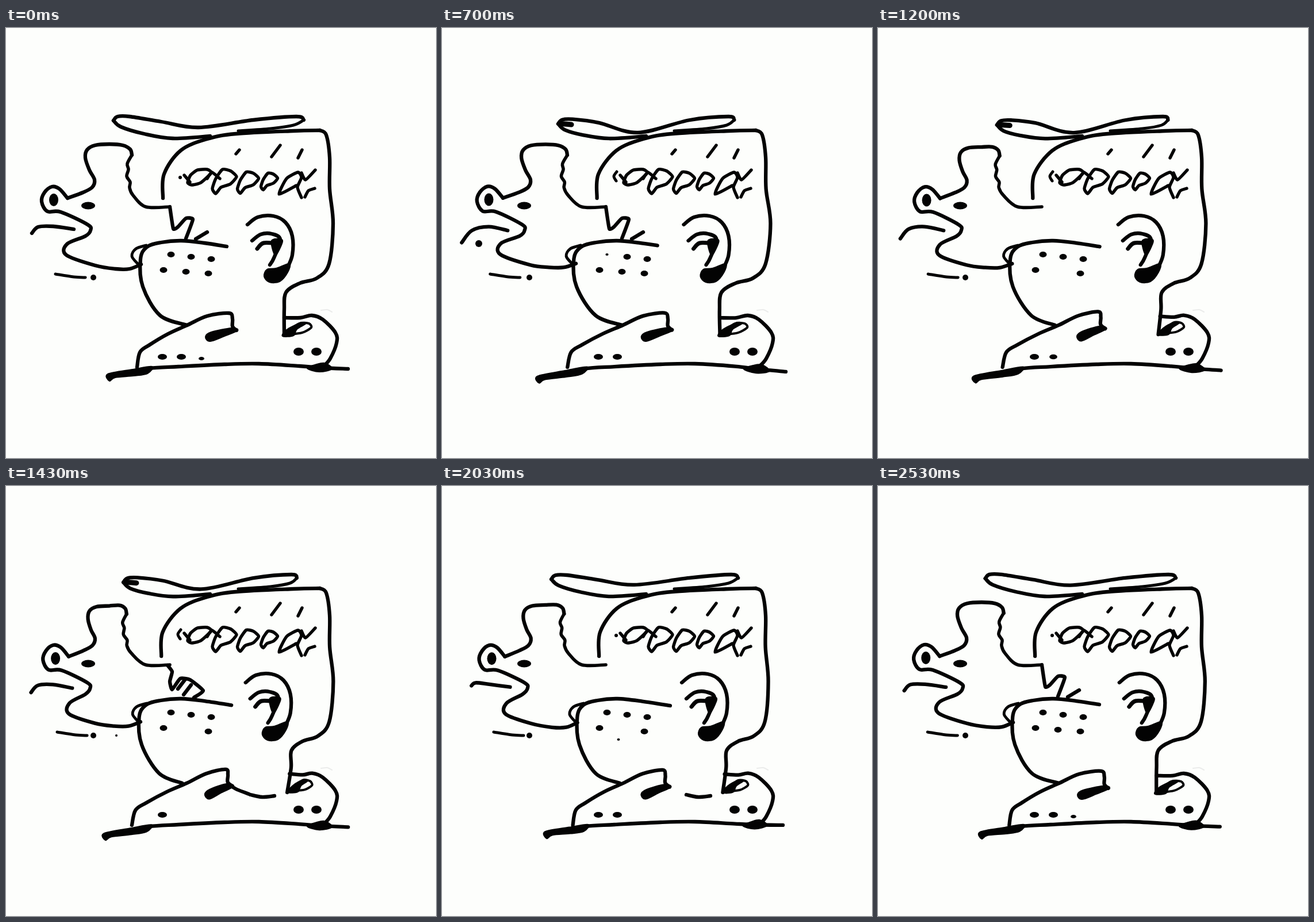
Recreate the animation shown at these times as an HTML page with a canvas. Size 748 px wide and 748 px high, loop 2.56 s.

```html
<!DOCTYPE html>
<html lang="en">
<head>
<meta charset="utf-8">
<title>Wobbling ink head</title>
<style>
html, body { margin: 0; width: 100%; height: 100%; overflow: hidden; background: #fdfefc; }
canvas { display: block; width: 748px; height: 748px; }
</style>
</head>
<body>
<canvas id="stage" width="748" height="748"></canvas>
<script>
const ctx = document.getElementById('stage').getContext('2d');
const LOOP = 2560, STEP = LOOP / 77, FADE = 120;
const PAPER = '#fdfefc', INK = '#030303';

const shapes = [], sways = [];

// A soft handle: points of the group near (x, y) swing once per loop
const sway = (group, x, y, reach, ax, ay, lag) =>
  sways.push({ group, x, y, reach, ax, ay, lag });

const line = (groups, points, opts = {}) => shapes.push({
  groups, width: 6.3, bend: 1, color: INK,
  pts: points.split(' ').map(p => p.split(',').map(Number)), ...opts,
});
const blob = (groups, points) => line(groups, points, { closed: true, fill: true, width: 2 });
const spot = (groups, x, y, rx, ry, on) =>
  shapes.push({ groups, pts: [[x, y]], rx, ry, on, color: INK });

// Brim
sway('b', 190, 160, 58, 21, 8, .4);
sway('b', 519, 160, 25, -14, 0, .3);
sway('t', 340, 172, 48, 8, 12, .8);
line('bt', '187,161 194,154 215,154 270,163 335,173 430,160 505,154 518,160');
line('b', '518,160 500,169 460,175 404,179', { width: 5 });
line('b', '187,161 200,172 240,184 290,192 355,188');
line('b', '194,161 212,163', { width: 9, on: [300, 1650] });

// Skull and neck
sway('h', 485, 485, 52, 17, 0, -.95);
sway('h', 273, 280, 50, -5, 0, .7);
sway('h', 568, 350, 60, 4, 0, 1.3);
line('h', '273,296 275,254 304,213 350,193 400,184 500,179 546,178');
line('h', '546,178 557,186 563,225 563,280 569,340 562,410 541,435 511,444 487,460 484,490 484,533');

// Face with snout
sway('f', 140, 225, 32, 6, 7, -.8);
sway('f', 178, 203, 25, 0, 9, -.8);
sway('f', 216, 222, 28, -12, 2, -.75);
sway('f', 214, 270, 30, -5, 0, 0);
sway('f', 82, 298, 38, 6, 2, -1.2);
sway('f', 147, 352, 22, -5, 0, 1.2);
sway('f', 102, 385, 30, 12, 4, -1.3);
sway('f', 200, 419, 40, -6, -4, 1);
line('f', '285,311 243,311 221,291 215,278 216,268 210,258 213,246 211,236 219,221', { width: 5.6 });
line('f', '219,221 216,211 203,204 180,202 155,204 141,212 138,226 145,247 154,264 150,277 134,286 107,296');
line('f', '107,296 93,280 80,276 67,286 62,302 72,319 95,320 142,342 147,352 138,362 106,376 105,395 155,413 190,419 215,419 235,411');
spot('f', 83, 299, 8, 11);
spot('', 143, 309, 12, 6.5);

// Lip and the dash below it
sway('l', 45, 357, 16, -17, 26, 1.3);
sway('l', 118, 350, 30, -5, 3, .8);
sway('d', 110, 432, 300, 7, 0, -1.3);
line('l', '45,357 56,346 82,345 118,350');
line('d', '86,428 118,433 138,434', { width: 5 });
spot('', 152, 434, 5, 5);
spot('', 192, 434, 2, 2, [1250, 1950]);
spot('', 64, 375, 6, 6, [390, 1200]);

// Teeth: a zigzag that turns into bars
const zigzag = { bend: .5, on: [2050, 1200] }, bars = { bend: .5, on: [1200, 2050] };
line('', '285,311 291,349 299,346 313,331 325,333 313,366', zigzag);
line('', '350,355 330,367', zigzag);
line('', '281,312 289,323 285,340 289,354 303,335 320,337 343,356 327,368', bars);
for (const x of [299, 309]) line('', `${x},${x + 54} ${x + 13},${x + 37}`, bars);

// Cheek
sway('c', 233, 420, 60, -7, 0, 1);
sway('c', 384, 380, 34, 24, 4, -1.4);
sway('c', 310, 517, 32, -10, 0, -.65);
sway('o', 225, 395, 60, -6, 0, 1.6);
line('c', '384,380 345,374 305,370 270,373 245,381 234,402 238,450 268,500 315,517');
line('o', '244,378 226,384 219,397 230,411', { width: 5 });
for (let i = 0; i < 6; i++) {
  const col = i % 3, row = i > 2;
  spot('', 287 + 35 * col - row * (13 - 4 * col), 394 + 4 * col + row * (27 - col), 6.5, 5,
    { 0: [650, 220], 4: [2050, 1200] }[i]);
}
spot('', 253, 423, 6, 4, [200, 700]);
spot('', 307, 441, 2.5, 2, [1650, 2400]);

// Hair: a rough leaf repeated, with looser ends
const hair = { width: 5.4, bend: .6 };
const leaf = [[-.5, .3], [-.36, -.12], [-.08, -.5], [.25, -.44], [.5, -.2], [.25, .1], [-.14, .24], [-.36, .5]];
for (const [x, y, size] of [[380, 267, 42], [421, 269, 37], [458, 267, 29]])
  line('', leaf.map(([u, v]) => [x + u * size, y + v * size]).join(' '), { ...hair, closed: true });
line('', '316,269 321,256 333,247 350,246 357,252 339,269 323,273', { ...hair, closed: true });
line('', '310,256 320,268', hair);
line('', '350,262 358,251 372,262', hair);
line('', '514,295 507,277 514,260 508,251 488,262 475,289 505,274', hair);
line('', '514,252 521,264 538,247', hair);
line('', '520,294 526,283 537,279', hair);
line('', '304,250 299,258 303,266', { width: 5, on: [250, 1600] });
line('', '406,212 400,219', hair);
line('', '477,204 462,224', hair);
line('', '515,212 508,226', hair);
spot('', 303, 260, 3, 3, [1650, 250]);
spot('', 435, 218, 4, 4, [1650, 2050]);

// Ear
sway('e', 465, 380, 300, -5, 0, -1);
line('e', '420,342 438,329 465,327 486,338 498,362 498,395 489,418');
line('e', '428,370 443,359 462,358 477,368 466,400 459,412');
line('e', '437,384 448,374 472,375', { width: 7 });
blob('e', '462,370 480,368 478,380 468,395');
blob('e', '454,420 470,418 493,410 490,425 476,441 458,442 449,432');

// Shoulders and collar
sway('s', 228, 590, 68, -13, 0, .6);
sway('s', 392, 515, 34, -10, -5, -.7);
sway('r', 484, 520, 32, 16, -6, -.9);
line('s', '228,590 233,564 250,551 282,532 315,517 350,501 388,496 394,506 394,519 401,526');
blob('s', '347,537 357,529 392,522 403,526 380,536 355,545');
line('r', '484,504 512,504 532,500 551,507 573,530 575,548 564,575 553,588');
line('r', '484,533 510,514 527,514 531,521 515,530', { width: 4, closed: true, bend: .7 });
blob('r', '481,536 488,525 510,514 522,514 506,524 500,535');
line('s', '396,524 408,531 425,537', bars);
line('', '425,537 445,541 467,539', { on: [1200, 2380] });
line('', '467,539 484,535 494,525', { on: [1600, 2050] });
line('', '548,491 559,490 567,494', { width: 2, color: '#ebeceb' });
for (const [x, on] of [[272], [305, [1600, 1300]]]) spot('', x, 572, 8, 5, on);
spot('', 340, 575, 5, 3, [2400, 650]);
for (const x of [509, 540]) spot('', x, 563, 9, 7);

// Ground
sway('g', 180, 606, 55, -15, 5, .9);
sway('g', 596, 594, 60, 5, 8, 1.35);
line('g', '180,606 215,600 250,592 300,589 380,585 440,584 510,588 550,591 595,593');
blob('g', '177,602 220,594 254,589 246,601 222,605 190,608 180,614');
blob('g', '524,592 540,585 555,583 567,593 545,598');

const swing = (t, lag) => (Math.cos(lag) - Math.cos(2 * Math.PI * t / LOOP + lag)) / 2;

// 0 to 1: how far a part with an [in, out] window has appeared
function shown(t, on) {
  if (!on) return 1;
  const since = (t - on[0] + LOOP) % LOOP, span = (on[1] - on[0] + LOOP) % LOOP;
  return Math.max(0, Math.min(1, since / FADE, (span - since) / FADE));
}

function warp([x, y], groups, t) {
  let sum = 0, dx = 0, dy = 0;
  for (const s of sways) {
    if (!groups.includes(s.group)) continue;
    const w = Math.exp(-((x - s.x) ** 2 + (y - s.y) ** 2) / s.reach ** 2);
    sum += w;
    dx += w * s.ax * swing(t, s.lag);
    dy += w * s.ay * swing(t, s.lag);
  }
  const n = Math.max(1, sum);
  return [x + dx / n, y + dy / n];
}

function trace(p, closed, bend) {
  const n = p.length, k = bend / 6;
  const at = i => closed ? p[(i + n) % n] : p[Math.max(0, Math.min(n - 1, i))];
  ctx.moveTo(...p[0]);
  for (let i = 0; i < (closed ? n : n - 1); i++) {
    const a = at(i - 1), b = at(i), c = at(i + 1), d = at(i + 2);
    ctx.bezierCurveTo(
      b[0] + (c[0] - a[0]) * k, b[1] + (c[1] - a[1]) * k,
      c[0] - (d[0] - b[0]) * k, c[1] - (d[1] - b[1]) * k, c[0], c[1]);
  }
  if (closed) ctx.closePath();
}

function draw(t) {
  ctx.fillStyle = PAPER;
  ctx.fillRect(0, 0, 748, 748);
  ctx.lineCap = ctx.lineJoin = 'round';
  for (const s of shapes) {
    const size = shown(t, s.on);
    if (size < .2) continue;
    const pts = s.pts.map(p => warp(p, s.groups, t));
    ctx.strokeStyle = ctx.fillStyle = s.color;
    ctx.beginPath();
    if (s.rx) {
      ctx.ellipse(...pts[0], s.rx * size, s.ry * size, 0, 0, 2 * Math.PI);
      ctx.fill();
      continue;
    }
    trace(pts, s.closed, s.bend);
    ctx.lineWidth = s.width * size;
    if (s.fill) ctx.fill();
    ctx.stroke();
  }
}

const start = performance.now();
function tick() {
  const t = (performance.now() - start) % LOOP;
  draw(Math.floor((t + 4) / STEP) * STEP % LOOP);
  requestAnimationFrame(tick);
}
tick();
</script>
</body>
</html>
```
